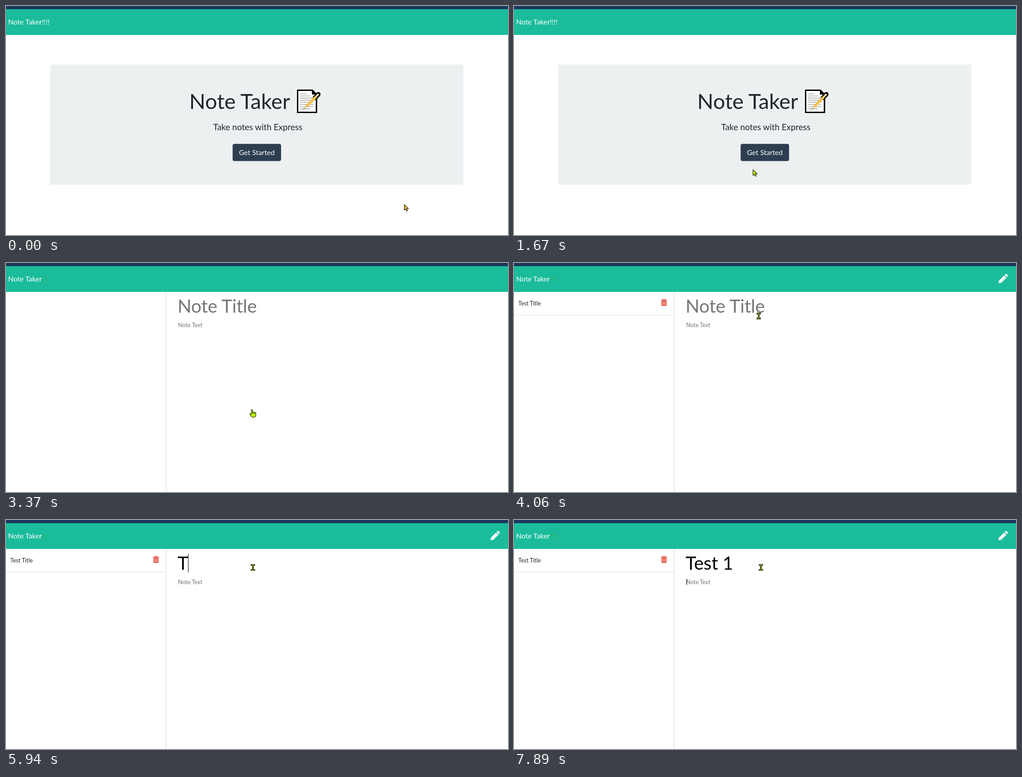
An HTML page that plays this animation: 1106 by 507 pixels, repeating every 8 s.

```html
<!DOCTYPE html>
<html lang="en">
<head>
<meta charset="utf-8">
<title>Note Taker</title>
<style>
  html, body { margin: 0; width: 100%; height: 100%; overflow: hidden; background: #fff; }
  svg { display: block; font-family: Lato, sans-serif; }
  text { white-space: pre; }
  .hint { fill: #757575; }
  .ink { fill: #212529; }
  .line { fill: #dfe1e3; }
  .cursor { fill: #b8f500; stroke: #1c2410; stroke-width: 1.1; stroke-linejoin: round; }
</style>
</head>
<body>
<svg width="1106" height="507" viewBox="0 0 1106 507">
  <rect width="1106" height="7" fill="#1b365d"/>
  <rect y="7" width="1106" height="57" fill="#1abc9c"/>
  <text x="4.8" y="41" font-size="15.625" fill="#fff">Note Taker<tspan id="bangs">!!!!</tspan></text>

  <g id="home">
    <rect x="97.5" y="129.5" width="910" height="266" rx="4" fill="#ecf0f1"/>
    <text class="ink" x="403.8" y="228" font-size="46.67">Note Taker</text>
    <g id="memo">
      <path d="M642.5 186.5H675L684 195.5V235.5H642.5Z" fill="#fff" stroke="#000" stroke-width="3"/>
      <path d="M674 186V196H684Z"/>
      <path d="M648 194.5h14M648 199.2h23M648 203.9h29M648 208.6h29M648 213.3h29M648 218h29M648 222.7h29M648 227.4h21" stroke="#a9a9a9" stroke-width="1.6"/>
      <path d="M681 203L688 195.5" stroke="#000" stroke-width="10" stroke-linecap="round"/>
      <path d="M683 200.5L687.5 196" stroke="#f0d6a4" stroke-width="4" stroke-linecap="round"/>
      <path d="M682.5 201.5L661.5 222.5" stroke="#f7c14d" stroke-width="5.6"/>
      <path d="M659.5 220.5L663.5 224.5L655 229Z" fill="#e8cf9d"/>
      <path d="M656.6 226.4L658 227.7L654.5 229.5Z" fill="#444"/>
    </g>
    <text class="ink" x="456.6" y="275" font-size="18.75">Take notes with Express</text>
    <rect id="ring" x="497" y="303" width="111" height="42.5" rx="6" fill="#94a0aa"/>
    <rect id="button" x="499.3" y="305.3" width="106.7" height="38" rx="4"/>
    <text x="513.3" y="330" font-size="15.625" fill="#fff">Get Started</text>
  </g>

  <g id="notes">
    <rect class="line" x="352" y="64" width="1.5" height="443"/>
    <g id="list">
      <text class="ink" x="9.6" y="94.3" font-size="12.5">Test Title</text>
      <rect class="line" y="114.5" width="352" height="1.3"/>
      <g fill="#e74c3c">
        <path d="M324 81.2h3.9l.8-1.2h3.6l.8 1.2h3.9v2H324Z"/>
        <path fill-rule="evenodd" d="M325 84H336V93.6Q336 95 334.6 95H326.4Q325 95 325 93.6ZM327.3 86v7h1v-7ZM330 86v7h1v-7ZM332.7 86v7h1v-7Z"/>
      </g>
      <g fill="#f3f7f7">
        <path d="M1067.4 44.7L1068.4 39L1079.8 27.6L1084.9 32.7L1073.5 44Z"/>
        <path d="M1080.9 26.5L1082.9 24.6Q1084.2 23.6 1085.5 24.7L1087.6 26.8Q1088.7 28.2 1087.6 29.5L1085.9 31.5Z"/>
      </g>
    </g>
    <text id="title" x="378" y="110" font-size="40"></text>
    <text class="hint" x="379.3" y="142" font-size="12.5">Note Text</text>
    <rect id="caret" width="1"/>
  </g>

  <g id="pointer">
    <path id="arrow" class="cursor" d="M.5 .5V13.2L3.5 10.4L5.6 15L7.7 14L5.7 9.6H9.8Z"/>
    <g id="hand" class="cursor">
      <path d="M-1.6 11V1.6Q-1.6 .3 -.3 .3Q1 .3 1 1.6V6.2Q2.4 5.2 3.6 6.5Q5 5.7 6 7Q8.5 6.6 8.5 8.8V12.5Q8.3 17.5 3.5 17.5H1.5Q-.8 17.3 -2 15L-4.7 11.2Q-5 9.4 -3.6 9.4Z"/>
      <path d="M1 6V9.5M3.6 6.5V9.5M6 7V9.8" fill="none"/>
    </g>
    <path id="beam" class="cursor" d="M-4.2 -6.8H4.2V-4.2H1.3V4.2H4.2V6.8H-4.2V4.2H-1.3V-4.2H-4.2Z" style="fill:#79990c"/>
  </g>
</svg>
<script>
const LOOP = 8000;
const OPEN_PAGE = 3370, SHOW_LIST = 3450, HOVER = 1830, CLICK = 2440;
const $ = id => document.getElementById(id);
const show = (id, on) => { $(id).style.display = on ? '' : 'none'; };
const clamp = v => Math.min(1, Math.max(0, v));
const ease = u => u * u * (3 - 2 * u);
const mix = (a, b, u) => a + (b - a) * u;
const glide = (a, b, u) => [mix(a[0], b[0], u), mix(a[1], b[1], u)];

// The swing below the heading and back up to the button
const swing = [[478, 262], [452, 305], [452, 368], [470, 414], [504, 398], [526, 362],
  [533, 345], [538, 333], [541, 327], [542, 325], [542, 324]];

// Each leg: first step, last step, number of steps, place at step i
const legs = [
  [0, 0, 1, () => [877, 439]],
  [70, 70, 1, () => [906, 418]],
  [450, 1210, 11, i => glide([906, 418], [509, 247], ease((i + 1) / 11))],
  [1290, 2060, 11, i => swing[i]],
  [OPEN_PAGE, 4140, 11, i => glide([542, 324], [539, 108], ease(clamp((i - 2) / 8)))],
  [4210, 4290, 2, i => [540 + i, 106 - i]],
  [4460, 4760, 5, i => glide([541, 105], [544, 105], (i + 1) / 5)]
];

// Time, typed text, caret x (null when blinked off), caret on the second line
const typing = [
  [0, '', null], [4460, '', 378], [4990, '', null], [5540, '', 378],
  [5940, 'T', 401], [6240, 'Te', 417], [6410, 'Tes', 434], [6640, 'Test', 449],
  [7110, 'Test ', 457], [7420, 'Test 1', 480], [7890, 'Test 1', 380, true]
];
const current = (rows, t) => rows.filter(r => r[0] <= t).pop();

function movePointer(t) {
  const [from, to, count, place] = current(legs, t);
  const step = count > 1 ? (to - from) / (count - 1) : 1;
  const i = Math.min(count - 1, Math.floor((t - from + 6) / step));
  const [x, y] = place(i);
  $('pointer').setAttribute('transform', `translate(${x} ${y})`);
  const beam = t >= OPEN_PAGE && y < 323.5;
  const hand = !beam && t >= HOVER;
  show('beam', beam);
  show('hand', hand);
  show('arrow', !beam && !hand);
  $('arrow').style.fill = t < 70 ? '#f3b840' : '';
}

function drawHome(t) {
  const u = clamp((t - HOVER) / 150);
  $('button').setAttribute('fill',
    `rgb(${mix(44, 30, u)},${mix(62, 43, u)},${mix(80, 55, u)})`);
  $('ring').style.opacity = clamp((t - CLICK) / 150);
}

function drawNotes(t) {
  show('list', t >= SHOW_LIST);
  const [, text, x, second] = current(typing, t);
  const title = $('title'), caret = $('caret');
  title.textContent = text || 'Note Title';
  title.setAttribute('class', text ? '' : 'hint');
  show('caret', x != null);
  if (x == null) return;
  caret.setAttribute('x', x);
  caret.setAttribute('y', second ? 130 : 75);
  caret.setAttribute('height', second ? 14 : 41);
}

const start = performance.now();
function frame() {
  const t = (performance.now() - start) % LOOP;
  const opened = t >= OPEN_PAGE;
  show('home', !opened);
  show('notes', opened);
  $('bangs').style.fill = opened ? '#2bb45a' : '';
  if (opened) drawNotes(t);
  else drawHome(t);
  movePointer(t);
  requestAnimationFrame(frame);
}
frame();
</script>
</body>
</html>
```
